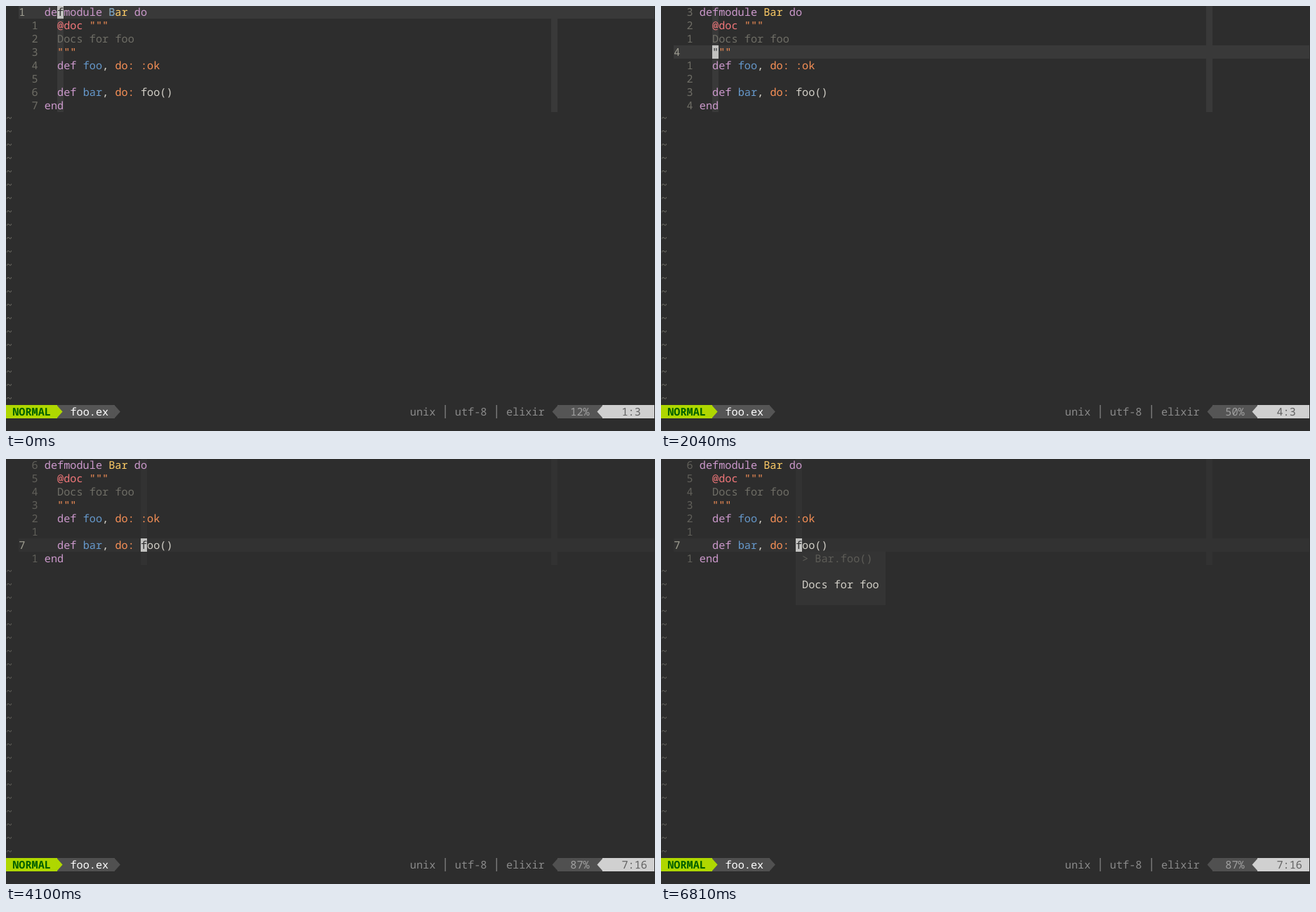
An HTML page that plays this animation: 925x605 px, repeating every 6850 ms.

```html
<!DOCTYPE html>
<html lang="en">
<head>
<meta charset="utf-8">
<title>Editor session</title>
<style>
  html, body { margin: 0; width: 100%; height: 100%; overflow: hidden; background: #2d2d2d; }
  svg { display: block; }
  text {
    font: 15.233px "Noto Sans Mono", "DejaVu Sans Mono", monospace;
    font-variant-ligatures: none;
    text-rendering: geometricPrecision;
    white-space: pre;
  }
  .bold { font-weight: 700; }
</style>
</head>
<body>
<svg id="stage" width="925" height="605" viewBox="0 0 925 605"></svg>
<script>
(() => {
const LOOP = 6850, CW = 9.14, LH = 18.96, GUTTER = 6, STATUS = 30;
const C = {
  bg: '#2d2d2d', fg: '#d3d0c8', dim: '#6f6e66', current: '#a09f93',
  purple: '#cc99cc', blue: '#6699cc', yellow: '#ffcc66', orange: '#f99157',
  red: '#f2777a', green: '#99cc99', cursor: '#c2c2c0', select: '#515151'
};

// Each token: column, text, colour
const lines = [
  [[0, 'defmodule', 'purple'], [10, 'Bar', 'yellow'], [14, 'do', 'purple']],
  [[2, '@doc', 'red'], [7, '"""', 'orange']],
  [[2, 'Docs', 'dim'], [7, 'for', 'dim'], [11, 'foo', 'dim']],
  [[2, '"""', 'orange']],
  [[2, 'def', 'purple'], [6, 'foo', 'blue'], [9, ',', 'fg'], [11, 'do:', 'orange'], [15, ':ok', 'orange']],
  [],
  [[2, 'def', 'purple'], [6, 'bar', 'blue'], [9, ',', 'fg'], [11, 'do:', 'orange'], [15, 'foo()', 'fg']],
  [[0, 'end', 'purple']]
];

// Each step keeps the values of the one before
const steps = [
  { t: 0, row: 0, col: 2, shown: 3, visual: false, soft: false, hover: false, mark: false, split: true },
  { t: 400, split: false },
  { t: 970, row: 1 },
  { t: 1130, visual: true },
  { t: 1300, row: 2 },
  { t: 1500, row: 3 },
  { t: 2000, visual: false },
  { t: 2170, row: 4 },
  { t: 2300, row: 5 },
  { t: 2440, row: 6 },
  { t: 2770, col: 4 },
  { t: 2800, soft: true },
  { t: 3200, shown: 5 },
  { t: 3470, col: 15, shown: 16 },
  { t: 4530, hover: true, mark: true },
  { t: 6410, mark: false }
];
for (let i = 1; i < steps.length; i++) steps[i] = { ...steps[i - 1], ...steps[i] };

const rowTop = row => Math.max(0, Math.round(row * LH - 0.8));
const escapeText = s => s.replace(/&/g, '&amp;').replace(/</g, '&lt;').replace(/>/g, '&gt;');

function box(col, row, w, h, fill) {
  const x = Math.round(col * CW), y = rowTop(row);
  const right = Math.min(924, Math.round((col + w) * CW));
  return `<rect x="${x}" y="${y}" width="${right - x}" height="${rowTop(row + h) - y}" fill="${fill}"/>`;
}

function text(col, row, s, fill, cls = '') {
  return `<text class="${cls}" x="${(col * CW).toFixed(2)}" y="${(row * LH + 13.8).toFixed(2)}" fill="${fill}">${escapeText(s)}</text>`;
}

// Status bar arrow; dir 1 points right, -1 left
function arrow(x, dir, fill) {
  const y = rowTop(STATUS), h = rowTop(STATUS + 1) - y;
  return `<path d="M${x} ${y}l${dir * 8.5} ${h / 2}l${-dir * 8.5} ${h / 2}z" fill="${fill}"/>`;
}

function charAt(row, col) {
  const tok = lines[row].find(([c, s]) => col >= c && col < c + s.length);
  return tok ? tok[1][col - tok[0]] : '';
}

function code(s) {
  const guide = s.soft ? '#323232' : '#393939';
  const n = lines.length;
  let out = box(GUTTER + 79, 0, 1, n, guide) + box(GUTTER + s.col, 0, 1, n, guide);
  if (!s.visual) out += box(2, s.row, 100, 1, guide);

  lines.forEach((tokens, r) => {
    if (s.visual && r >= 1 && r <= s.row) {
      const [c, str] = tokens[tokens.length - 1];
      out += box(GUTTER, r, c + str.length, 1, C.select);
    }
    const here = r === s.row;
    out += text(here ? 2 : 4, r, String(here ? r + 1 : Math.abs(r - s.row)),
      here ? C.current : s.soft ? '#61605a' : C.dim);
    for (const [c, str, hue] of tokens) out += text(GUTTER + c, r, str, C[hue]);
  });
  if (s.split) out += text(GUTTER + 10, 0, 'B', C.blue);

  if (s.mark) out += box(GUTTER + 16, 6, 2, 1, '#5a5a5a') + text(GUTTER + 16, 6, 'oo', '#7c7b76');
  out += box(GUTTER + s.col, s.row, 1, 1, C.cursor);
  out += text(GUTTER + s.col, s.row, charAt(s.row, s.col), C.bg);

  for (let r = n; r < STATUS; r++) out += text(0, r, '~', s.soft ? '#64635d' : C.dim);
  return out;
}

function hover() {
  return box(21, 7, 14, 4, '#343434') +
    text(22, 7, '> Bar.foo()', '#5d5c57') +
    text(22, 9, 'Docs for foo', C.fg);
}

function statusBar(s) {
  const [label, back, ink] = s.visual
    ? ['V-LINE', '#ff8700', '#870000']
    : ['NORMAL', '#afd700', '#005f00'];
  const mid = s.soft ? '#505050' : '#555555', light = '#d0d0d0', grey = '#8a8a8a';
  const percent = Math.floor((s.row + 1) / lines.length * 100) + '%';
  const at = (col, str, fill, cls) => text(col, STATUS, str, fill, cls);
  const bar = col => `<rect x="${(col + .5) * CW - .6}" y="${rowTop(STATUS)}" width="1.2" height="19" fill="${grey}"/>`;

  return box(8, STATUS, 9, 1, mid) + arrow(17 * CW - 1, 1, mid) +
    box(0, STATUS, 8, 1, back) + arrow(8 * CW - 1, 1, back) +
    at(1, label, ink, 'bold') + at(10, 'foo.ex', '#ffffff') +
    at(63, 'unix', grey) + bar(68) + at(70, 'utf-8', grey) + bar(76) + at(78, 'elixir', grey) +
    arrow(86 * CW + 1, -1, mid) + box(86, STATUS, 7, 1, mid) + at(88, percent, '#a0a0a0') +
    arrow(93 * CW + 1, -1, light) + box(93, STATUS, 9, 1, light) +
    at(96, `${s.row + 1}:${s.shown}`, '#606060');
}

function message(s) {
  if (!s.visual) return '';
  return text(0, STATUS + 1, '-- VISUAL LINE --', C.green, 'bold') +
    text(90, STATUS + 1, String(s.row), C.fg);
}

const stage = document.getElementById('stage');
const start = performance.now();
let last = null;

function tick() {
  const t = (performance.now() - start) % LOOP;
  const s = steps.filter(step => step.t <= t).pop();
  if (s !== last) {
    stage.innerHTML = code(s) + (s.hover ? hover() : '') + statusBar(s) + message(s);
    last = s;
  }
  requestAnimationFrame(tick);
}
tick();
})();
</script>
</body>
</html>
```
